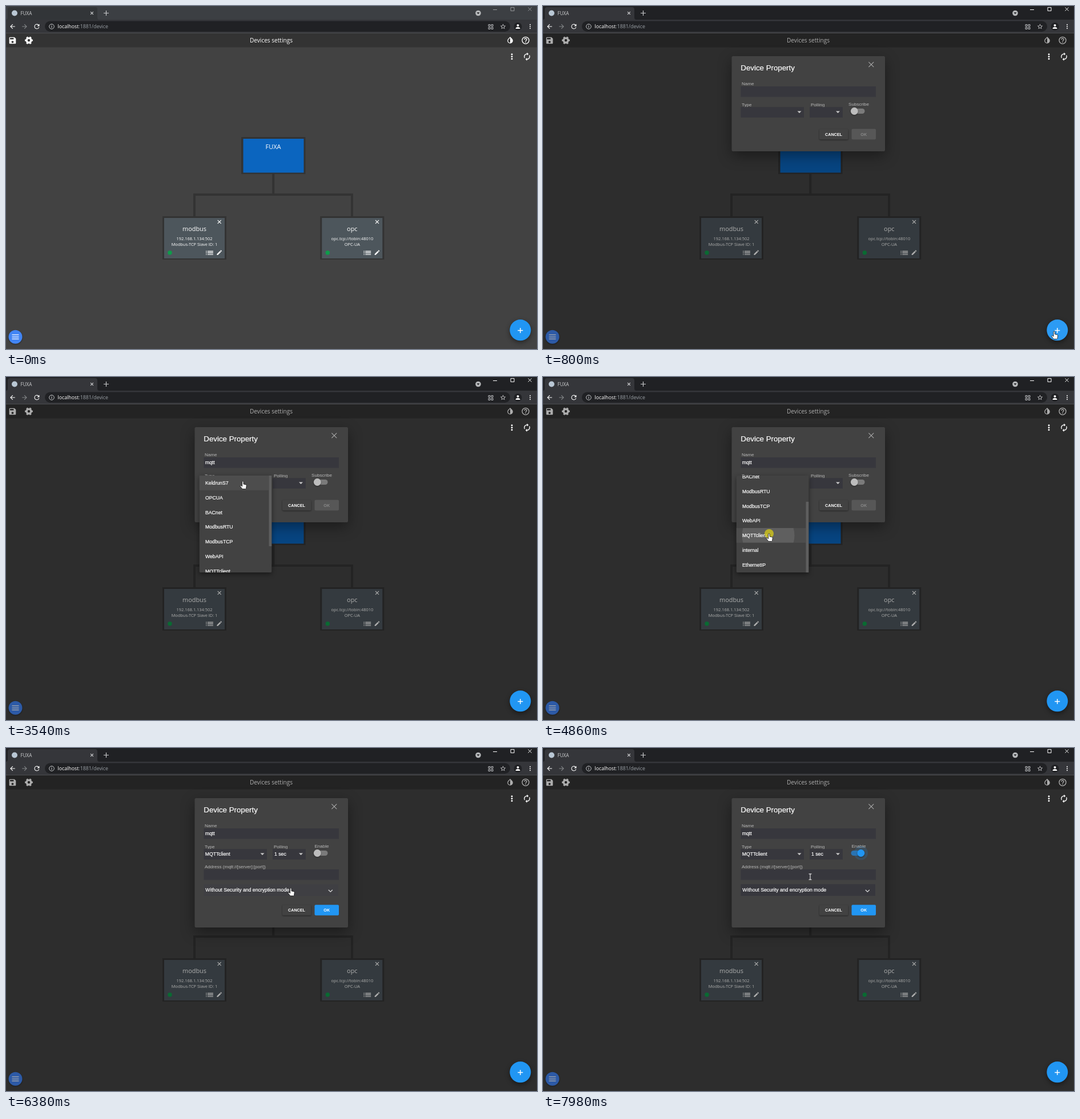
An HTML page for the animation above (8 s loop, 930x602 px).

```html
<!DOCTYPE html>
<html lang="en">
<head>
<meta charset="utf-8">
<title>Devices settings</title>
<style>
html, body { margin: 0; width: 100%; height: 100%; overflow: hidden; background: #424242; }
svg { display: block; }
text { font-family: "Open Sans", "Noto Sans", sans-serif; fill: #fff; white-space: pre; }
.ui text { font-family: "Liberation Sans", Arial, sans-serif; font-size: 8.7px; stroke: #fff; stroke-width: .2px; }
.ui .title { font-size: 13.3px; }
.ui .label { font-size: 8.05px; fill: #b9b9b9; stroke: none; }
.ui .btn { font-size: 7.2px; font-weight: bold; stroke: none; }
.mid { text-anchor: middle; }
.field { fill: #37373d; }
.line { fill: none; stroke: #fff; }
.raised { filter: drop-shadow(0 1px 1px rgba(0,0,0,.45)); }
.float { filter: drop-shadow(0 3px 4px rgba(0,0,0,.45)); }
.dialog { filter: drop-shadow(0 8px 12px rgba(0,0,0,.4)); }
</style>
</head>
<body>
<svg id="stage" width="930" height="602" viewBox="0 0 930 602"></svg>
<script>
const LOOP = 8000, ROW = 25.75, LIST_Y = 173, LIST_H = 170, SCROLL = 62.4;

const icons = {
  save: 'M17 3H5c-1.11 0-2 .9-2 2v14c0 1.1.89 2 2 2h14c1.1 0 2-.9 2-2V7l-4-4zm-5 16c-1.66 0-3-1.34-3-3s1.34-3 3-3 3 1.34 3 3-1.34 3-3 3zm3-10H5V5h10v4z',
  drop: 'M17.66 7.93L12 2.27 6.34 7.93c-3.12 3.12-3.12 8.19 0 11.31 3.12 3.12 8.19 3.12 11.32 0 3.12-3.12 3.12-8.19 0-11.31zM12 19.59c-3.3 0-6-2.7-6-6 0-1.6.62-3.11 1.76-4.24L12 5.1z',
  help: 'M11 18h2v-2h-2zM12 2a10 10 0 1 0 0 20 10 10 0 1 0 0-20zm0 18a8 8 0 1 1 0-16 8 8 0 1 1 0 16zm0-14c-2.21 0-4 1.79-4 4h2c0-1.1.9-2 2-2s2 .9 2 2c0 2-3 1.75-3 5h2c0-2.25 3-2.5 3-5 0-2.21-1.79-4-4-4z',
  renew: 'M12 6v3l4-4-4-4v3c-4.42 0-8 3.58-8 8 0 1.57.46 3.03 1.24 4.26L6.7 14.8c-.45-.83-.7-1.79-.7-2.8 0-3.31 2.69-6 6-6zm6.76 1.74L17.3 9.2c.44.84.7 1.79.7 2.8 0 3.31-2.69 6-6 6v-3l-4 4 4 4v-3c4.42 0 8-3.58 8-8 0-1.57-.46-3.03-1.24-4.26z',
  list: 'M3 13h2v-2H3zm0 4h2v-2H3zm0-8h2V7H3zm4 4h14v-2H7zm0 4h14v-2H7zM7 7v2h14V7z',
  edit: 'M3 17.25V21h3.75L17.81 9.94l-3.75-3.75zM20.71 7.04c.39-.39.39-1.02 0-1.41l-2.34-2.34c-.39-.39-1.02-.39-1.41 0l-1.83 1.83 3.75 3.75z',
  back: 'M20 11H7.83l5.59-5.59L12 4l-8 8 8 8 1.41-1.41L7.83 13H20z',
  reload: 'M17.65 6.35A8 8 0 1 0 19.73 14h-2.08A6 6 0 1 1 12 6c1.66 0 3.14.69 4.22 1.78L13 11h7V4z',
  star: 'M22 9.24l-7.19-.62L12 2 9.19 8.63 2 9.24l5.46 4.73L5.82 21 12 17.27 18.18 21l-1.63-7.03zM12 15.4l-3.76 2.27 1-4.28-3.32-2.88 4.38-.38L12 6.1l1.71 4.04 4.38.38-3.32 2.88 1 4.28z'
};

const rect = (x, y, w, h, fill, extra = '') => `<rect x="${x}" y="${y}" width="${w}" height="${h}" fill="${fill}" ${extra}/>`;
const circle = (x, y, r, fill, extra = '') => `<circle cx="${x}" cy="${y}" r="${r}" fill="${fill}" ${extra}/>`;
const text = (x, y, str, cls = '', extra = '') => `<text x="${x}" y="${y}" class="${cls}" ${extra}>${str}</text>`;
const line = (d, w = 1.2, color = '#fff', extra = '') => `<path class="line" d="${d}" stroke-width="${w}" style="stroke:${color}" ${extra}/>`;
const icon = (name, x, y, size, fill = '#fff', extra = '') =>
  `<path d="${icons[name]}" fill="${fill}" transform="translate(${x} ${y}) ${extra} scale(${size / 24}) translate(-12 -12)"/>`;
const cross = (x, y, r, w, color) => line(`M${x - r} ${y - r}l${2 * r} ${2 * r}m0 ${-2 * r}l${-2 * r} ${2 * r}`, w, color);
const dots = (x, y, gap, r) => [-1, 0, 1].map(i => circle(x, y + i * gap, r, '#fff')).join('');
const field = (x, y, w, h = 18.5) => `<rect class="field" x="${x}" y="${y}" width="${w}" height="${h}"/>`;
const arrowDown = (x, y) => `<path d="M${x - 3.5} ${y - 1.8}h7l-3.5 3.6z" fill="#ccc"/>`;

const browser = `
  ${rect(0, 0, 930, 25, '#202124', 'id="strip"')}
  <path id="tab" d="M0 24q3 0 3-4V6q0-4 4-4h149q4 0 4 4v14q0 4 3 4z" fill="#35363a"/>
  ${rect(0, 24, 930, 24, '#35363a')}
  ${circle(15, 12.5, 5, '#b9c7d4')}
  ${text(25.5, 15.5, 'FUXA', '', 'font-size="8.1" style="fill:#d0d1d3"')}
  ${cross(150.5, 12.5, 2.4, 1.1, '#d5d6d8')}
  ${line('M171 12.5h9m-4.5 -4.5v9', 1.2, '#c8c9cb')}
  ${circle(827, 12.5, 4.8, '#b6b8ba')}<path d="M824.5 11.3h5l-2.5 3z" fill="#202124"/>
  <g id="controls">${line('M853 6.5h7M884 2.5h6v6h-6z', 1)}${cross(917.5, 5.5, 3, 1, '#fff')}</g>
  ${icon('back', 11.5, 36, 13)}${icon('back', 32.5, 36, 13, '#85878a', 'scale(-1 1)')}${icon('reload', 54, 36, 13.5)}
  ${rect(68, 26.5, 815, 18.5, '#202124', 'rx="9.2"')}
  ${circle(80, 36, 4.3, 'none', 'stroke="#c4c6c8"')}${line('M80 35v3.3M80 33v1.1', 1.1, '#c4c6c8')}
  <text x="90.5" y="39.2" font-size="8.8">localhost<tspan fill="#9aa0a6">:1881/device</tspan></text>
  ${line('M845 32.5h3v3h-3zM850 32.5h3v3h-3zM845 37.5h3v3h-3zM850 37.5h3v3h-3z', 1, '#bdbfc1')}
  ${icon('star', 870.5, 36, 11.5, '#d0d1d3')}
  ${circle(896.5, 36, 7, '#202124')}${circle(896.5, 34, 2, '#fff')}<path d="M892.5 40q0-3 4-3t4 3z" fill="#fff"/>
  ${dots(918, 36, 3.3, 1)}
  ${rect(0, 47, 930, 1, '#4c4d50')}`;

const card = (x, name, address, type) => `
  ${rect(x - 56, 369, 112, 76, '#333')}${rect(x - 53, 372, 106, 71, '#4d565c')}
  ${cross(x + 43.7, 378.8, 3, 1.2, '#fff')}
  ${text(x, 395, name, 'mid', 'font-size="10.9"')}
  ${text(x, 410.5, address, 'mid', 'font-size="7.4"')}
  ${text(x, 421.3, type, 'mid', 'font-size="7.4"')}
  ${circle(x - 43, 433, 3.7, '#0e9c4a')}
  ${icon('list', x + 26.5, 433.3, 17)}${icon('edit', x + 43.7, 432.7, 11.5)}`;

const page = `
  ${rect(0, 48, 930, 554, '#424242')}${rect(0, 48, 930, 24.5, '#333')}
  ${icon('save', 11.5, 60.5, 15.5)}
  ${circle(40, 60.3, 3.9, 'none', 'stroke="#fff" stroke-width="3.4"')}
  ${circle(40, 60.3, 5.9, 'none', 'stroke="#fff" stroke-width="2" pathLength="12" stroke-dasharray="1" stroke-dashoffset=".5"')}
  ${text(464.5, 64.3, 'Devices settings', 'mid', 'font-size="10.1"')}
  ${icon('drop', 883, 60, 14.5)}${icon('help', 910, 60.3, 16)}
  ${line('M468.2 294V331M330 370V331H606V370', 4, '#333')}
  ${rect(412, 230, 112.5, 65, '#333')}${rect(415.5, 233, 106, 59.5, '#0b65bf')}
  ${text(468, 251.3, 'FUXA', 'mid', 'font-size="11"')}
  ${card(330, 'modbus', '192.168.1.134:502', 'Modbus-TCP Slave ID: 1')}
  ${card(606.3, 'opc', 'opc.tcp://tobin:48010', 'OPC-UA')}
  <g class="raised">${circle(16.5, 580.7, 12, '#4285f4')}</g>
  ${line('M10.5 577.2h12m-12 3.6h12m-12 3.6h12', 1.3)}`;

const floating = `
  ${dots(886, 88.8, 4, 1.5)}${icon('renew', 912.5, 88.8, 16)}
  <g class="float">${circle(900.8, 568.8, 18.5, '#2196f3')}</g>
  ${circle(900.8, 568.8, 18.5, '#fff', 'id="fabGlow"')}
  ${line('M896.3 569.5h9m-4.5 -4.5v9', 1.4)}`;

const dialog = `
  <g class="dialog">${rect(330.5, 88, 268.5, 167, '#424242', 'rx="2.5" id="sheet"')}</g>
  ${text(346.3, 113, 'Device Property', 'title')}
  ${cross(574.8, 102.8, 4.4, 1.1, '#aaa')}
  ${text(348, 139, 'Name', 'label')}${field(346.5, 141, 236.5)}
  ${rect(347, 141.5, 235.5, 17.5, 'none', 'stroke="#1976d2" id="focusRing"')}
  ${text(348.7, 153, '', '', 'id="name"')}${rect(349, 145, 1, 10, '#fff', 'id="caret"')}
  ${text(348, 175.5, 'Type', 'label')}${field(346.5, 177.3, 110.5)}${arrowDown(449, 186.2)}
  ${text(348.7, 189, '', '', 'id="type"')}
  ${text(469, 175.5, 'Polling', 'label')}${field(467, 177.3, 58)}${arrowDown(516.5, 186.2)}
  ${text(470, 189, '', '', 'id="polling"')}
  ${text(553, 175, '', 'label mid', 'id="toggleLabel"')}
  ${circle(556.8, 184.3, 12.3, '#2196f3', 'opacity=".16" id="halo"')}
  ${rect(539.5, 180, 24, 9, '#7b7b7b', 'rx="4.5" id="track"')}
  ${circle(545.3, 184.5, 6.4, '#bdbdbd', 'id="thumb" class="raised"')}
  <g id="extra">
    ${text(348, 211.3, 'Address (mqtt://[server]:[port])', 'label')}${field(346.5, 213, 236.5)}
    ${rect(346.5, 239, 235.5, 20.5, '#37373d', 'id="security"')}
    ${text(349.3, 252, 'Without Security and encryption mode')}
    ${line('M564.8 249l3.5 3.5 3.5-3.5', 1.2, '#ddd')}
  </g>
  <g id="buttons">
    <g class="raised">${rect(484, 215.7, 50.5, 18.5, '#424242', 'rx="2"')}</g>
    ${text(509, 227.5, 'CANCEL', 'btn mid')}
    ${rect(540.5, 215.7, 42.5, 18.5, '#575757', 'rx="2" id="okBox"')}
    ${text(561.7, 227.5, 'OK', 'btn mid', 'id="okText"')}
  </g>`;

const dropdown = (id, x, w, items) => `
  <g id="${id}" class="float"><svg x="${x}" y="${LIST_Y}" width="${w}" height="${LIST_H}">
    ${rect(0, 0, w, LIST_H, '#424242', 'rx="2"')}
    <g id="${id}Rows">
      ${rect(0, 0, w - 5, ROW, '#4d4d4d', `id="${id}Hover"`)}
      ${id === 'types' ? `<svg y="${6 * ROW}" width="${w - 5}" height="${ROW}">${circle(56, 13, 46, '#fff', 'opacity=".1" id="ripple"')}</svg>` : ''}
      ${items.map((s, i) => text(10.5, i * ROW + 16, s)).join('')}
    </g>
    ${rect(w - 5, 0, 5, 124, '#5e5e5e', `id="${id}Thumb"`)}
  </svg></g>`;

const cursors = `
  ${circle(0, 0, 8, '#cabf1e', 'opacity=".85" id="click"')}
  <path id="hand" fill="#fff" stroke="#111" stroke-width=".8" d="M-1.4 1c0-1.6 2.4-1.6 2.4 0v4l3.9.9c1 .3 1.4.9 1.3 1.9l-.6 4.2c-.1 1-.6 1.5-1.5 1.5h-4.2c-.8 0-1.3-.3-1.8-1l-3-4c.4-1.1 1.6-1.1 2.4-.4l1.1.9z"/>
  <path id="arrow" fill="#fff" stroke="#111" stroke-width=".8" d="M0 0v11l2.6-2.4 1.7 4 1.7-.8-1.7-3.8h3.5z"/>
  <g id="beam">${line('M-2.5 -5h5M0 -5v10M-2.5 5h5', 1)}</g>`;

const stage = document.getElementById('stage');
stage.innerHTML = browser + page + rect(0, 48, 930, 554, '#000', 'id="shade"') + floating +
  `<g class="ui"><g id="dialog">${dialog}</g>
  ${dropdown('types', 338.5, 127, ['KeldrunS7', 'OPCUA', 'BACnet', 'ModbusRTU', 'ModbusTCP', 'WebAPI', 'MQTTclient', 'internal', 'EthernetIP'])}
  ${dropdown('rates', 458, 76, ['200 ms', '500 ms', '1 sec', '2 sec', '3 sec', '5 sec', '10 sec', '30 sec', '1 min'])}</g>
  <g id="cursor">${cursors}</g>`;

const el = {};
stage.querySelectorAll('[id]').forEach(n => el[n.id] = n);
const set = (id, attrs) => { for (const k in attrs) el[id].setAttribute(k, attrs[k]); };
const show = (id, on) => el[id].style.display = on ? '' : 'none';
const write = (id, str) => { if (el[id].textContent !== str) el[id].textContent = str; };

// Stepped progress: the first step lands on t0, the last on t1.
const steps = (t, t0, t1, n) => t < t0 ? 0 : t >= t1 ? 1 : (Math.floor((t - t0) / (t1 - t0) * (n - 1) + 1e-6) + 1) / n;

// start, end, steps, x, y, cursor at the end, cursor on the way
const moves = [
  [190, 500, 4, 895.5, 571, 'hand', 'arrow'],
  [930, 930, 1, 692, 504, 'arrow'],
  [1040, 1480, 5, 384, 152, 'beam', 'arrow'],
  [2920, 3140, 3, 415, 190, 'hand', 'arrow'],
  [3340, 3340, 1, 415, 183, 'hand'],
  [3640, 3640, 1, 413, 187, 'hand'],
  [4150, 4530, 5, 396, 275, 'hand', 'hand'],
  [5040, 5260, 3, 495, 184, 'hand', 'arrow'],
  [5790, 6090, 4, 499, 262, 'hand', 'hand'],
  [6190, 6190, 1, 499, 246, 'hand'],
  [6520, 7100, 7, 552.5, 180, 'hand', 'arrow'],
  [7470, 7980, 6, 468, 226, 'beam', 'arrow']
];
const clicks = [[600, 710], [1480, 1590], [3340, 3440], [4860, 4940], [5380, 5490], [6330, 6380], [7270, 7370]];

function pointer(t) {
  let x = 940, y = 480, kind = 'arrow';
  for (const [t0, t1, n, toX, toY, end, via] of moves) {
    if (t < t0) break;
    const p = steps(t, t0, t1, n);
    x += (toX - x) * p;
    y += (toY - y) * p;
    kind = p < 1 ? via : end;
  }
  return { x, y, kind };
}

function drawList(id, opacity, scroll, y) {
  show(id, opacity > 0);
  set(id, { opacity });
  set(id + 'Rows', { transform: `translate(0 ${-scroll})` });
  set(id + 'Thumb', { y: scroll / SCROLL * 46 });
  set(id + 'Hover', { y: Math.max(0, Math.floor((y - LIST_Y + scroll) / ROW)) * ROW });
}

function draw(t) {
  const within = (a, b) => t >= a && t < b;
  const mouse = pointer(t);

  const active = t >= 600;
  set('strip', { fill: active ? '#202124' : '#3c3f43' });
  set('tab', { fill: active ? '#35363a' : '#323538' });
  set('controls', { opacity: active ? 1 : .45 });
  set('fabGlow', { opacity: within(500, 800) ? .12 : within(800, 930) ? .05 : 0 });

  const opening = t < 800;
  show('dialog', t >= 710);
  set('shade', { opacity: t < 710 ? 0 : opening ? .04 : .32 });
  set('dialog', {
    opacity: opening ? .3 : 1,
    transform: opening ? 'translate(465 171.5) scale(.806) translate(-465 -171.5)' : ''
  });

  const typed = [2220, 2320, 2520, 2610].filter(k => t >= k).length;
  write('name', 'mqtt'.slice(0, typed));
  show('focusRing', within(1590, 3340));
  show('caret', within(1590, 1800) || within(2000, 2920) || within(3140, 3340));
  set('caret', { x: 349 + (typed ? Math.round(el.name.getComputedTextLength()) : 0) });

  const chosen = t >= 5040, on = t >= 7370;
  set('sheet', { height: chosen ? 227 : 167 });
  write('type', chosen ? 'MQTTclient' : '');
  write('polling', t >= 6380 ? '1 sec' : '');
  write('toggleLabel', chosen ? 'Enable' : 'Subscribe');
  show('extra', chosen);
  set('security', { fill: within(6380, 6620) ? '#3f3f43' : '#37373d' });
  set('buttons', { transform: `translate(0 ${chosen ? 59.6 : 0})` });
  set('okBox', { fill: chosen ? '#2196f3' : '#575757' });
  el.okText.style.fill = chosen ? '#fff' : '#8a8a8a';

  show('halo', on);
  set('track', { fill: on ? '#2a74b3' : '#7b7b7b' });
  set('thumb', { cx: on ? 556.8 : 545.3, fill: on ? '#2196f3' : '#bdbdbd' });

  const typesOpacity = within(3440, 3540) ? .5 : within(3540, 4940) ? 1 : within(4940, 5040) ? .5 : 0;
  const ratesOpacity = within(5380, 5490) ? .4 : within(5490, 6380) ? 1 : 0;
  drawList('types', typesOpacity, SCROLL * steps(t, 3860, 4050, 3), mouse.y);
  drawList('rates', ratesOpacity, 0, mouse.y);
  show('ripple', t >= 4860);
  set('ripple', { r: t < 4940 ? 46 : 90 });

  show('cursor', t >= 190);
  set('cursor', { transform: `translate(${mouse.x} ${mouse.y})` });
  for (const kind of ['hand', 'arrow', 'beam']) show(kind, kind === mouse.kind);
  show('click', clicks.some(([a, b]) => within(a, b)));
}

const start = performance.now();
function tick() {
  draw((performance.now() - start) % LOOP);
  requestAnimationFrame(tick);
}
tick();
</script>
</body>
</html>
```
